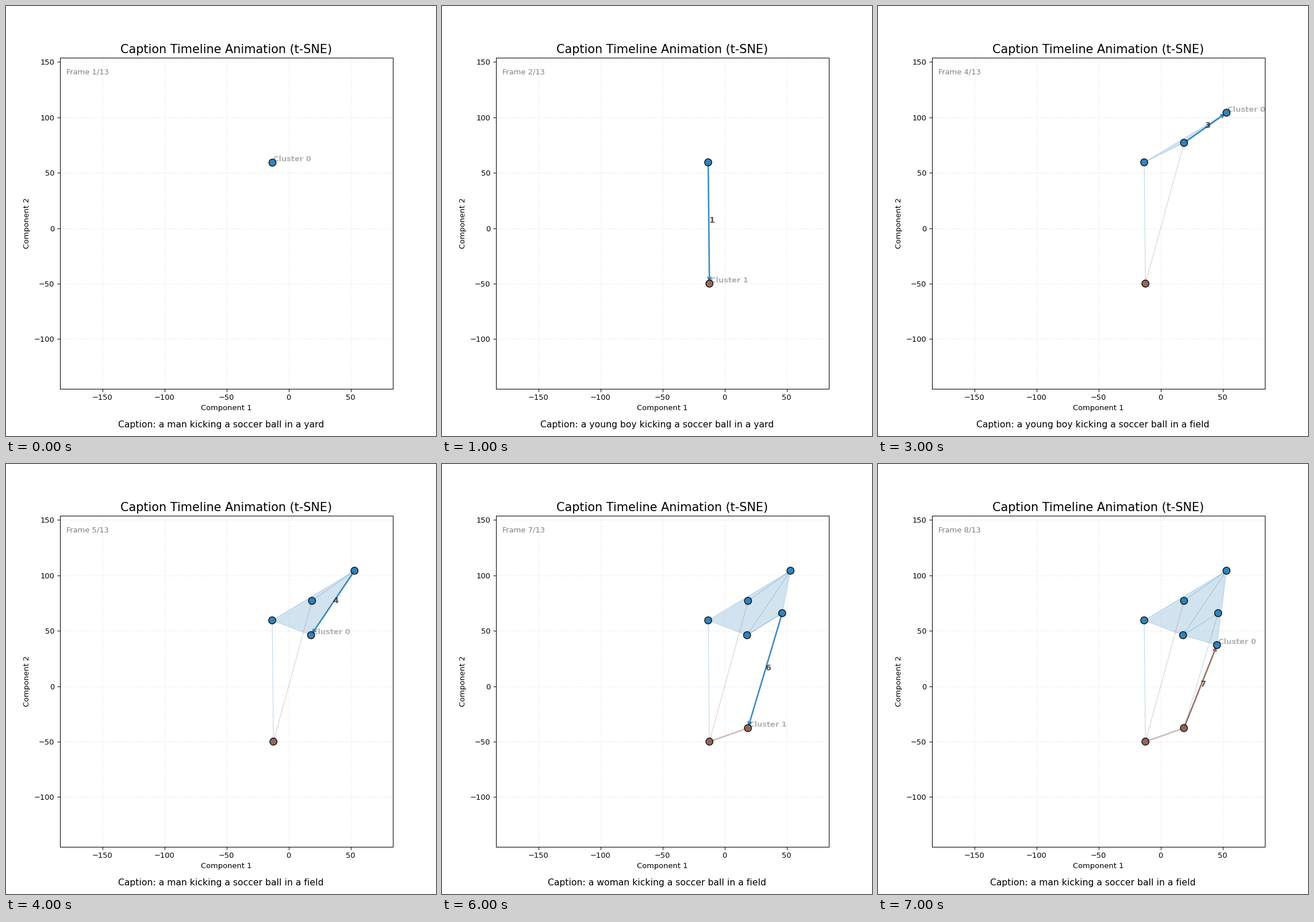
Animation of 748x748 px, one loop 8000 ms. Source, as a matplotlib script:

```python
import matplotlib.pyplot as plt
from matplotlib.animation import FuncAnimation
from matplotlib.patches import Polygon

POINTS = [(-13.2, 59.4), (-12.2, -50.0), (18.9, 77.0), (53.1, 104.2),
          (18.1, 46.0), (46.4, 65.9), (18.8, -37.8), (45.4, 37.1)]
CLUSTERS = [0, 1, 0, 0, 0, 0, 1, 0]
COLORS = ["#1f77b4", "#8c564b"]
TOTAL = 13

ENDINGS = {0: ("man", "yard"), 1: ("young boy", "yard"),
           3: ("young boy", "field"), 6: ("woman", "field")}

plt.rcParams["font.family"] = "DejaVu Sans"
fig, ax = plt.subplots(figsize=(8, 8), dpi=93.5)
ax.set_xlim(-184.3, 84.1)
ax.set_ylim(-144.8, 153.9)
ax.set_title("Caption Timeline Animation (t-SNE)", fontsize=16)
ax.set_xlabel("Component 1")
ax.set_ylabel("Component 2")
ax.grid(True, linestyle="--", alpha=0.2)

counter = ax.text(0.02, 0.95, "", transform=ax.transAxes, color="gray")
caption = fig.text(0.5, 0.02, "", ha="center", fontsize=12)
drawn = []


def half_hull(points):
    chain = []
    for x, y in points:
        while len(chain) > 1:
            (ax0, ay0), (bx, by) = chain[-2:]
            if (bx - ax0) * (y - ay0) - (by - ay0) * (x - ax0) > 0:
                break
            chain.pop()
        chain.append((x, y))
    return chain[:-1]


def hull(points):
    ordered = sorted(points)
    return half_hull(ordered) + half_hull(ordered[::-1])


def draw_cluster(members, color):
    if len(members) == 2:
        drawn.extend(ax.plot(*zip(*members), color=color, lw=2, alpha=0.4))
    elif len(members) > 2:
        shape = Polygon(hull(members), color=color, lw=1, alpha=0.2)
        drawn.append(ax.add_patch(shape))


def draw_arrow(step, lw, alpha):
    style = dict(arrowstyle="->", lw=lw, alpha=alpha,
                 color=COLORS[CLUSTERS[step - 1]])
    drawn.append(ax.annotate("", xy=POINTS[step], xytext=POINTS[step - 1],
                             arrowprops=style))


def update(frame):
    while drawn:
        drawn.pop().remove()

    shown = POINTS[:frame + 1]
    for cluster, color in enumerate(COLORS):
        draw_cluster([p for p, c in zip(shown, CLUSTERS) if c == cluster], color)

    x, y = shown[-1]
    drawn.append(ax.text(x + 1, y + 1, f"Cluster {CLUSTERS[frame]}",
                         color="gray", weight="bold", alpha=0.6))

    for step in range(1, frame):
        draw_arrow(step, 0.8, 0.3)
    if frame:
        draw_arrow(frame, 2, 0.85)
        px, py = shown[-2]
        drawn.append(ax.text((x + px) / 2, (y + py) / 2, str(frame),
                             weight="bold", fontsize=11, alpha=0.65))

    colors = [COLORS[c] for c in CLUSTERS[:frame + 1]]
    drawn.append(ax.scatter(*zip(*shown), s=90, c=colors, edgecolors="black",
                            linewidths=1.1, alpha=0.9, zorder=5))

    who, where = ENDINGS.get(frame, ("man", "field"))
    counter.set_text(f"Frame {frame + 1}/{TOTAL}")
    caption.set_text(f"Caption: a {who} kicking a soccer ball in a {where}")
    return drawn


anim = FuncAnimation(fig, update, frames=len(POINTS), init_func=lambda: [],
                     interval=1000, repeat=True, repeat_delay=0)
plt.show()
```
